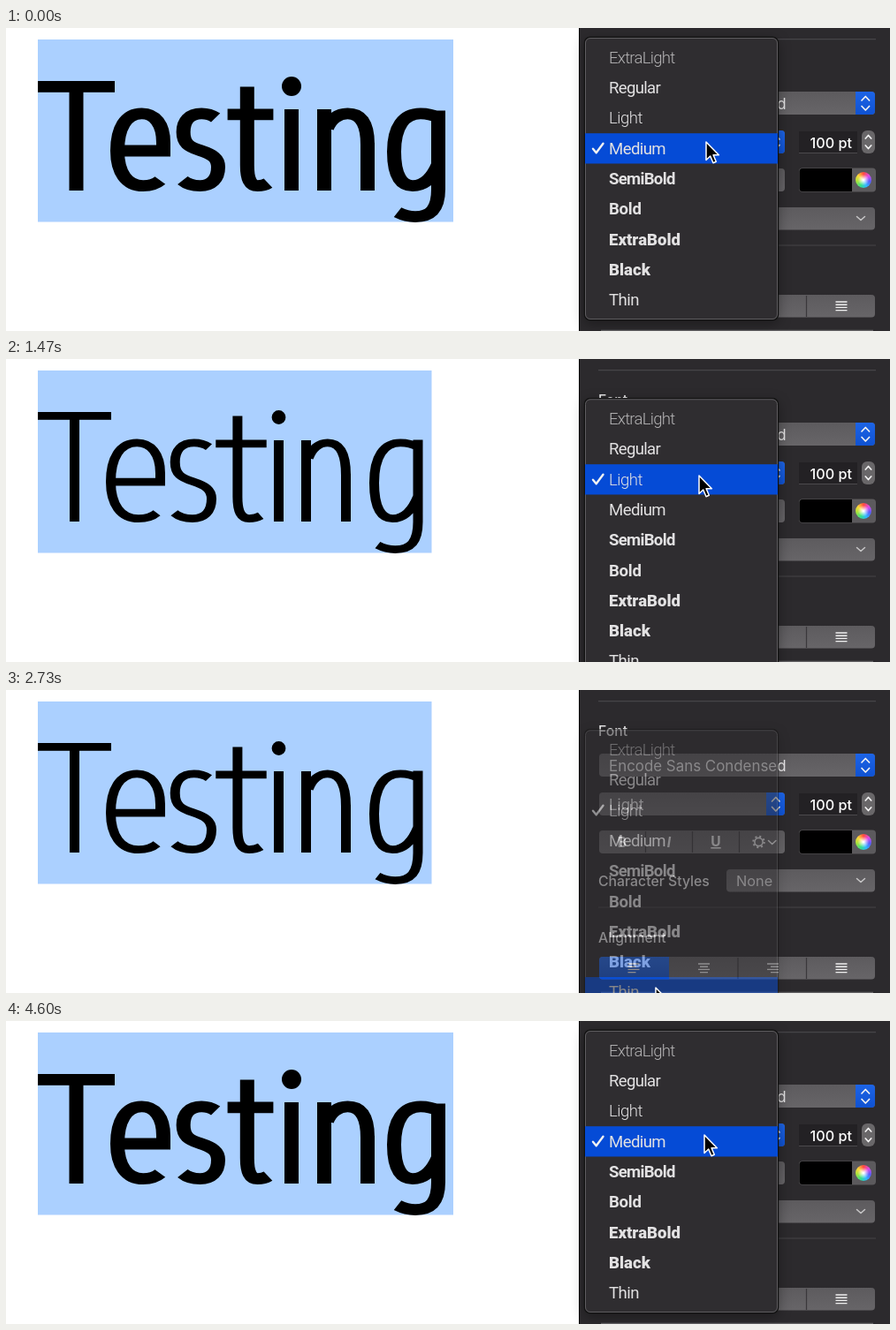
An HTML page for the animation above (4670 ms loop, 1000x343 px).

```html
<!DOCTYPE html>
<html lang="en">
<head>
<meta charset="utf-8">
<title>Font weight menu</title>
<style>
  html, body { margin: 0; width: 100%; height: 100%; overflow: hidden; background: #fff; }
  svg { display: block; width: 100vw; height: 100vh; }
  text { font-family: Inter, "Open Sans", sans-serif; fill: #e6e5e6; }
  .label { font-size: 15.8px; font-weight: 500; }
  .value { font-size: 16.9px; }
  .item { font-family: Roboto, "Open Sans", sans-serif; font-size: 18.6px; fill: #e2e1e2; }
  .seg { font-size: 15.5px; font-weight: 700; text-anchor: middle; }
  .ctl { fill: url(#grey); }
  .blue { fill: url(#blue); }
  .line { fill: none; stroke: #f2f2f2; stroke-width: 1.7; stroke-linecap: round; stroke-linejoin: round; }
  .rule { stroke: #464448; stroke-width: 1.2; }
  .gap { stroke: #3a383b; stroke-width: 1.2; }
  .wheel { width: 18px; height: 18px; border-radius: 50%;
    background: radial-gradient(circle, #fff 4%, #fff0 50%),
      conic-gradient(#ff4a3d, #e04ae8, #5a5cff, #2fb8ff, #35e08a, #a8e63c, #ffd83a, #ff4a3d); }
  #frame { filter: drop-shadow(0 4px 7px #0005); }
</style>
</head>
<body>
<svg id="stage" viewBox="0 0 1000 343" preserveAspectRatio="none">
  <defs>
    <linearGradient id="grey" x2="0" y2="1"><stop stop-color="#5d5b5e"/><stop offset="1" stop-color="#676568"/></linearGradient>
    <linearGradient id="blue" x2="0" y2="1"><stop stop-color="#1d64e6"/><stop offset="1" stop-color="#0f52d2"/></linearGradient>
  </defs>
  <rect width="1000" height="343" fill="#fff"/>
  <rect id="selection" x="36" y="13" height="206.5" fill="#abd0ff"/>
  <g id="word" role="img" aria-label="Testing"></g>

  <g id="panel">
    <rect x="648" width="352" height="343" fill="#2c2a2d"/>
    <path d="M648.5 0V343" stroke="#0c0b0c"/>
    <path class="rule" d="M670 12.7H984M670 246H984"/>
    <text class="label" x="670" y="51.5">Font</text>
    <text class="label" x="670" y="222">Character Styles</text>
    <text class="label" x="670" y="286">Alignment</text>

    <rect class="ctl" x="671" y="72" width="312" height="26" rx="4"/>
    <path class="blue" d="M961 72H979Q983 72 983 76V94Q983 98 979 98H961Z"/>
    <path class="line" d="M968 82L972.3 77.5L976.6 82M968 88.5L972.3 93L976.6 88.5"/>
    <text class="value" x="682" y="92">Encode Sans Condensed</text>

    <rect class="ctl" x="671" y="116" width="210" height="26" rx="4"/>
    <path class="blue" d="M860 116H877Q881 116 881 120V138Q881 142 877 142H860Z"/>
    <path class="line" d="M866.5 126L870.8 121.5L875 126M866.5 132.5L870.8 137L875 132.5"/>
    <text class="value" id="weight" x="682" y="136"></text>

    <rect x="897" y="117" width="66" height="25" fill="#232124"/>
    <path d="M897 141.5H963" stroke="#4b494c"/>
    <text class="value" x="957" y="136" text-anchor="end" style="font-size:16.2px;font-weight:500;fill:#fff">100 pt</text>
    <rect x="968" y="116" width="15" height="26" rx="6" fill="#696769"/>
    <path class="line" d="M972.3 125L975.5 121.5L978.7 125M972.3 133L975.5 136.5L978.7 133"/>

    <rect class="ctl" x="671" y="159" width="210" height="26" rx="4"/>
    <path class="gap" d="M723.5 160V184M776.5 160V184M829.5 160V184"/>
    <text class="seg" x="697" y="178">B</text>
    <text class="seg" x="750" y="178" font-style="italic">I</text>
    <text class="seg" x="803" y="177" text-decoration="underline">U</text>
    <g fill="none" stroke="#e6e5e6">
      <circle cx="851.5" cy="172" r="4.6" stroke-width="1.6"/>
      <circle cx="851.5" cy="172" r="6.2" stroke-width="2" stroke-dasharray="2 2.87"/>
    </g>
    <path class="line" style="stroke-width:1.5" d="M862.5 170.5L866.7 174.5L870.9 170.5"/>

    <rect x="897" y="158.5" width="87" height="27" rx="4" fill="#5c5a5d"/>
    <path d="M957 159H901Q897.5 159 897.5 162.5V181.5Q897.5 185 901 185H957Z" fill="#000"/>
    <foreignObject x="960.5" y="163" width="18" height="18"><div class="wheel"></div></foreignObject>

    <rect class="ctl" x="815" y="203" width="168" height="25.5" rx="4"/>
    <text class="value" style="font-size:16.3px" x="826" y="221.5">None</text>
    <path class="line" style="stroke:#c8c7c8;stroke-width:1.5" d="M962.5 213.5L967 217.5L971.5 213.5"/>

    <rect class="ctl" x="671" y="302" width="312" height="25.5" rx="4"/>
    <path class="blue" d="M750 302H675Q671 302 671 306V323.5Q671 327.5 675 327.5H750Z"/>
    <path class="gap" d="M828 303V327M905.5 303V327"/>
    <path id="icons" stroke="#f0f0f0" stroke-width="1.4"/>
    <path d="M673 342.5H981" stroke="#656366" stroke-width="1.6"/>
  </g>

  <g id="menu">
    <rect id="frame" x="654.5" y="-.5" width="219" height="320" rx="6" fill="#2f2d30" stroke="#111" stroke-width="1.4"/>
    <rect x="655.5" y=".5" width="217" height="318" rx="5.5" fill="none" stroke="#5f5d60"/>
    <rect id="glow" x="655" width="218" height="34.3" fill="#054bd6"/>
    <path id="check" class="line" style="stroke-width:2.4" d="M664 .5L667.7 5L675.5 -5.5"/>
  </g>
  <path id="cursor" d="M0 0V20.5L4.7 16L8 23.7L11.3 22.3L8.1 14.7H14.4Z" fill="#000" stroke="#fff" stroke-width="1.5" stroke-linejoin="round"/>
</svg>
<script>
const $ = id => document.getElementById(id);
const NS = 'http://www.w3.org/2000/svg';
function add(parent, tag, attrs, text = '') {
  const el = document.createElementNS(NS, tag);
  for (const k in attrs) el.setAttribute(k, attrs[k]);
  el.textContent = text;
  return parent.appendChild(el);
}

// Lettering: centrelines, x in percent of the glyph width, y in pixels.
const shapes = {
  e: 'M0 139 L100 139 L100 130 C100 109 81 97.5 53 97.5 C18 97.5 0 114 0 139 C0 163 20 178 56 178 C72 178 84 176 93 172',
  s: 'M93 102 C80 98.5 68 97.5 54 97.5 C22 97.5 4 105 4 118 C4 131 20 134.5 50 138.5 C84 143 100 147 100 157 C100 171 80 178 50 178 C32 178 14 176 2 172',
  t: 'M40 67 L40 155 C40 171 50 178 72 178 C86 178 95 177 104 175 M-20 98.5 L120 98.5',
  n: 'M6 114 C14 104 32 97.5 54 97.5 C84 97.5 100 108 100 132',
  g: 'M100 102 C88 99 74 97.5 60 97.5 C22 97.5 0 112 0 140 C0 166 16 178 42 178 C66 178 86 170 100 154 M100 94 L100 182 C100 204 84 213 48 213 C32 213 20 211 8 208'
};
const faces = {
  Medium: { pen: 12.8, end: 506, T: [36, 123], e: [118, 186], s: [191, 248], t: [250, 303], i: [314, 332], n: [352, 417], g: [431, 497], dot: 11 },
  Light: { pen: 8.8, end: 481.5, T: [36, 119], e: [113, 180], s: [184, 238], t: [240, 292], i: [302, 315], n: [334, 390], g: [411, 471.5], dot: 7.9 }
};
const SX = 1.25; // stems are this much heavier than bars

function drawWord(face) {
  const { pen, T, i, n } = face, stem = pen * SX;
  const g = add($('word'), 'g', {});
  const box = (x, y, w, bottom) => add(g, 'rect', { x, y, width: w, height: bottom - y });
  const shift = (14 - pen) / 2;
  const mapY = y => +y + shift * Math.max(-1, Math.min(1, (y - 138) / 40));
  box(T[0], 60, T[1] - T[0], 60 + pen);
  box((T[0] + T[1] - stem) / 2, 60, stem, 184);
  box((i[0] + i[1] - stem) / 2, 92, stem, 184);
  box(n[0], 92, stem, 184);
  box(n[1] - stem, 130, stem, 184);
  add(g, 'circle', { cx: (i[0] + i[1]) / 2, cy: 66, r: face.dot });
  for (const key in shapes) {
    const [l, r] = face[key];
    const mapX = u => (l + stem / 2 + u / 100 * (r - l - stem)) / SX;
    const d = shapes[key].replace(/(-?[\d.]+) (-?[\d.]+)/g,
      (_, x, y) => mapX(x).toFixed(2) + ' ' + mapY(y).toFixed(2));
    add(g, 'path', { d, fill: 'none', stroke: '#000', 'stroke-width': pen, transform: `scale(${SX} 1)` });
  }
  return g;
}
for (const name in faces) faces[name].node = drawWord(faces[name]);

// Alignment icons: left, centre, right, justified.
$('icons').setAttribute('d', [[710, 0], [789.5, .5], [867.5, 1], [945, 0]].map(([cx, side], k) =>
  [0, 1, 2, 3].map(row => {
    const w = k < 3 && row % 2 ? 9 : 13;
    return `M${cx - 6.5 + (13 - w) * side} ${310 + row * 3.2}h${w}`;
  }).join('')).join(''));

// Menu rows: name, weight, tracking.
const ROW = 34.3;
const rows = [['ExtraLight', 300, -.75], ['Regular', 400, -.7], ['Light', 300, -.5], ['Medium', 400, -.6],
  ['SemiBold', 600, -.7], ['Bold', 700, -.3], ['ExtraBold', 800, 0], ['Black', 900, 0], ['Thin', 400, -.5]];
rows.forEach(([name, weight, track], k) => add($('menu'), 'text', {
  class: 'item', x: 682, y: 28.8 + k * ROW,
  style: `font-weight:${weight};letter-spacing:${track}px` + (k ? '' : ';fill:#b4b3b4')
}, name));

const LOOP = 4670, STEPS = 70, STEP = 1000 / 15;
const path = [[0, 792, 129], [2, 792, 128], [7, 785, 97], [11, 785, 97], [14, 785, 127], [22, 784, 132], [24, 784, 133],
  [32, 737, 336], [41, 735, 337], [48, 735, 335], [55, 797, 113], [57, 797, 113], [60, 790, 129], [70, 790, 129]];
const menus = [
  { from: 0, to: 13, top: 11, check: 3, pick: 2 },
  { from: 19, to: 42, top: 45.3, check: 2, pick: 8 },
  { from: 61, to: 73, top: 11, check: 3, pick: 3 }
];

function cursorAt(step) {
  const k = path.findIndex(p => p[0] > step);
  const [a, x, y] = path[k - 1], [b, x2, y2] = path[k];
  const u = (step - a) / (b - a), s = u * u * (3 - 2 * u);
  return [x + (x2 - x) * s, y + (y2 - y) * s];
}

function render(step) {
  const [x, y] = cursorAt(step);
  $('cursor').setAttribute('transform', `translate(${x} ${y})`);

  const name = step >= 16 && step < 45 ? 'Light' : 'Medium';
  for (const key in faces) faces[key].node.style.display = key === name ? '' : 'none';
  $('selection').setAttribute('width', faces[name].end - 36);
  $('weight').textContent = name;

  const m = menus.find(m => step >= m.from && step <= m.to);
  $('menu').style.display = m ? '' : 'none';
  if (!m) return;
  const left = m.to - step; // blink once, then fade out
  const row = left <= 3 ? m.pick : Math.floor((y - m.top - 5.3) / ROW);
  $('menu').setAttribute('transform', `translate(0 ${m.top})`);
  $('menu').setAttribute('opacity', [.2, .5][left] ?? 1);
  $('glow').setAttribute('y', 5.3 + row * ROW);
  $('glow').style.display = left === 3 ? 'none' : '';
  $('check').setAttribute('transform', `translate(0 ${22.3 + m.check * ROW})`);
}

const start = performance.now();
function tick() {
  const t = (performance.now() - start) % LOOP;
  // a small lead absorbs the rounding of step times
  render(Math.min(STEPS - 1, Math.floor((t + 12) / STEP)));
  requestAnimationFrame(tick);
}
tick();
</script>
</body>
</html>
```
